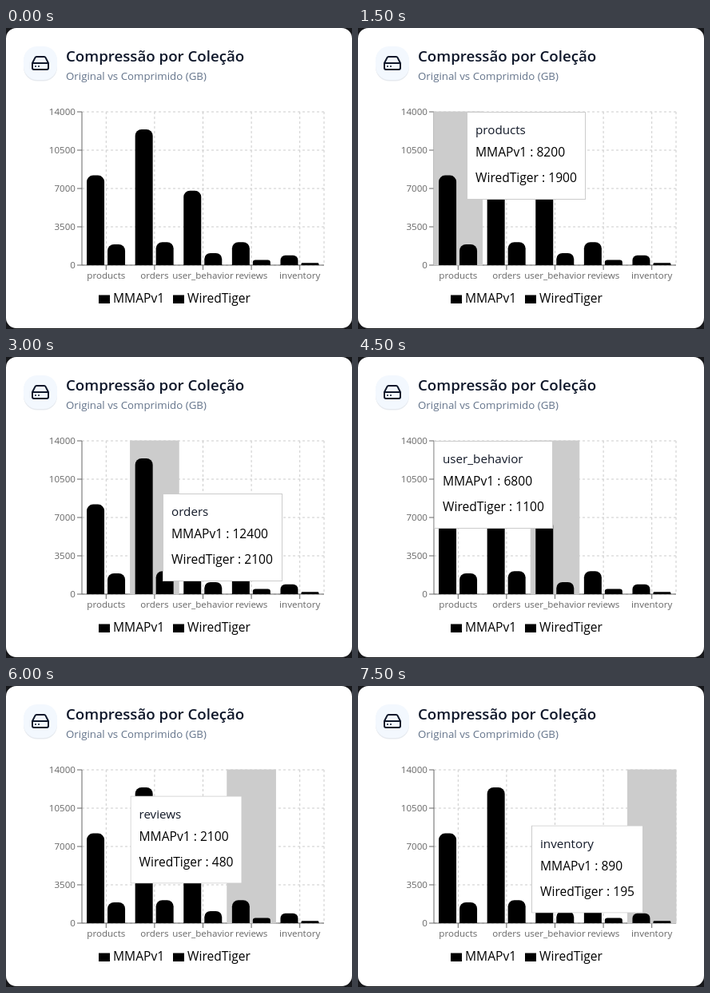
An HTML page that plays this animation: 433x377 px, repeating every 9000 ms.

```html
<!DOCTYPE html>
<html lang="pt">
<head>
<meta charset="utf-8">
<title>Compressão por Coleção</title>
<style>
  html, body { margin: 0; width: 100%; height: 100%; overflow: hidden; background: #17181b; }
  svg { display: block; font-family: "Open Sans", "Noto Sans", sans-serif; font-size: 15.6px; }
  .title { font-size: 18.7px; font-weight: 600; fill: #0f172a; }
  .subtitle { font-size: 13.3px; fill: #64748b; }
  .tick { font-size: 11.6px; fill: #666; }
  .label { font-size: 15.2px; fill: #111827; }
  .grid { stroke: #ccc; stroke-dasharray: 3 3; }
  .axis { stroke: #666; }
  .icon { fill: none; stroke: #0f172a; stroke-width: 2; stroke-linecap: round; stroke-linejoin: round; }
</style>
</head>
<body>
<svg width="433" height="377" viewBox="0 0 433 377">
  <rect width="433" height="376" rx="13" fill="#fff"/>
  <rect x="22" y="24.5" width="42" height="42" rx="17" fill="#e6eaef"/>
  <rect x="22" y="23" width="42" height="42" rx="17" fill="#f3f8fe"/>
  <g class="icon" transform="translate(31 32)">
    <path d="M22 12H2M5.45 5.11 2 12v6a2 2 0 0 0 2 2h16a2 2 0 0 0 2-2v-6l-3.45-6.89A2 2 0 0 0 16.76 4H7.24a2 2 0 0 0-1.79 1.11zM6 16h.01M10 16h.01"/>
  </g>
  <text class="title" x="75" y="42">Compressão por Coleção</text>
  <text class="subtitle" x="75" y="65">Original vs Comprimido (GB)</text>
  <g id="chart"></g>
</svg>
<script>
const LOOP = 9000, HOLD = 1500;
const plot = { left: 95, top: 105, right: 398, bottom: 297, max: 14000 };
const series = ["MMAPv1", "WiredTiger"];
const rows = [
  { name: "products", values: [8200, 1900], tip: [136, 105, 149] },
  { name: "orders", values: [12400, 2100], tip: [196, 171, 150] },
  { name: "user_behavior", values: [6800, 1100], tip: [95, 105, 149] },
  { name: "reviews", values: [2100, 480], tip: [155.5, 137.5, 140] },
  { name: "inventory", values: [890, 195], tip: [217, 174.5, 140] }
];
const band = (plot.right - plot.left) / rows.length;
const height = plot.bottom - plot.top;
const bandX = i => plot.left + i * band;
const valueY = v => plot.bottom - v / plot.max * height;
const chart = document.getElementById("chart");

function add(parent, tag, attrs, text) {
  const el = document.createElementNS("http://www.w3.org/2000/svg", tag);
  for (const key in attrs) el.setAttribute(key, attrs[key]);
  if (text) el.textContent = text;
  return parent.appendChild(el);
}

const line = (cls, x1, y1, x2, y2) => add(chart, "line", { class: cls, x1, y1, x2, y2 });

function showDuring(el, step) {
  const from = step * HOLD / LOOP, to = (step + 1) * HOLD / LOOP;
  el.animate([
    { opacity: 0, offset: 0 }, { opacity: 0, offset: from },
    { opacity: 1, offset: from }, { opacity: 1, offset: to },
    { opacity: 0, offset: to }, { opacity: 0, offset: 1 }
  ], { duration: LOOP, iterations: Infinity });
}

function drawBar(x, value) {
  const y = valueY(value), w = 22;
  const r = Math.min(8, (plot.bottom - y) / 2);
  add(chart, "path", {
    d: `M${x} ${plot.bottom}V${y + r}a${r} ${r} 0 0 1 ${r} ${-r}h${w - 2 * r}a${r} ${r} 0 0 1 ${r} ${r}V${plot.bottom}z`
  });
}

function drawTooltip({ name, values, tip: [x, y, width] }) {
  const g = add(chart, "g", { transform: `translate(${x} ${y})`, opacity: 0 });
  add(g, "rect", { x: .5, y: .5, width: width - 1, height: 109, fill: "#fff", stroke: "#ccc" });
  add(g, "text", { class: "label", x: 11, y: 28 }, name);
  series.forEach((s, i) => add(g, "text", { x: 11, y: 56 + 32 * i }, `${s} : ${values[i]}`));
  return g;
}

// Grid, axes and tick labels
const ticks = [0, 3500, 7000, 10500, 14000];
ticks.forEach(v => line("grid", plot.left, valueY(v), plot.right, valueY(v)));
rows.forEach((_, i) => line("grid", bandX(i + .5), plot.top, bandX(i + .5), plot.bottom));
line("grid", plot.right, plot.top, plot.right, plot.bottom);
line("axis", plot.left, plot.top, plot.left, plot.bottom);
line("axis", plot.left, plot.bottom, plot.right, plot.bottom);
ticks.forEach(v => {
  line("axis", plot.left - 6, valueY(v), plot.left, valueY(v));
  add(chart, "text", { class: "tick", x: 87, y: valueY(v) + 4, "text-anchor": "end" }, String(v));
});
rows.forEach(({ name }, i) => {
  const x = bandX(i + .5);
  line("axis", x, plot.bottom, x, plot.bottom + 6);
  add(chart, "text", { class: "tick", x, y: 314, "text-anchor": "middle" }, name);
});

// Hover bands sit below the bars, tooltips above everything
rows.forEach((_, i) => showDuring(add(chart, "rect", {
  x: bandX(i), y: plot.top, width: band, height, fill: "#ccc", stroke: "#ccc", opacity: 0
}), i + 1));
rows.forEach(({ values }, i) =>
  values.forEach((v, j) => drawBar(bandX(i) + 6.06 + 26 * j, v)));
series.forEach((s, i) => {
  const x = 116 + 93 * i;
  add(chart, "rect", { x, y: 334.5, width: 14, height: 10.5 });
  add(chart, "text", { x: x + 18, y: 344 }, s);
});
rows.forEach((row, i) => showDuring(drawTooltip(row), i + 1));
</script>
</body>
</html>
```
